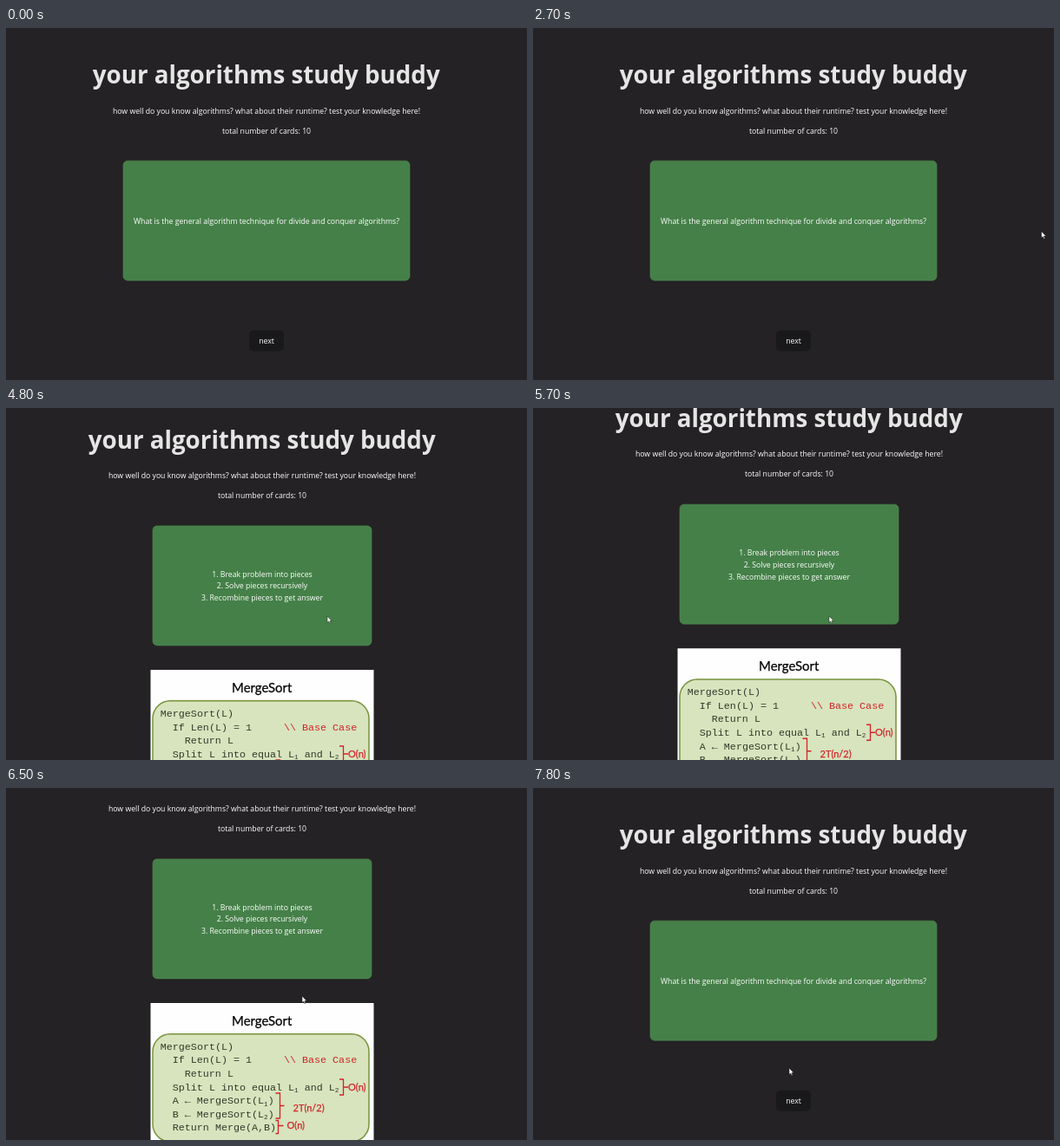
An HTML page for the animation above (8000 ms loop, 600 px wide and 406 px high).

```html
<!DOCTYPE html>
<html lang="en">
<head>
<meta charset="utf-8">
<title>Study cards</title>
<style>
  html, body { margin: 0; width: 100%; height: 100%; overflow: hidden; background: #242224; }
  svg { display: block; width: 100%; height: 100%; }
  text { font-family: "Open Sans", "Noto Sans", sans-serif; font-size: 8.7px; fill: #fff; white-space: pre; }
  .mid { text-anchor: middle; }
  .title { font-size: 27.75px; font-weight: 700; fill: #e5e5e5; }
  .card { fill: #458048; stroke: #4f8a53; stroke-width: .6; }
  .button { fill: #19181a; }
  .slide text { font-family: "Liberation Mono", "Courier New", monospace; font-size: 11.7px; fill: #34382c; }
  .slide .sub { font-size: 7.7px; }
  .slide .head, .slide .note { font-family: Lato, sans-serif; stroke-width: .25; }
  .slide .head { font-size: 14.9px; fill: #000; stroke: #000; }
  .slide .note { font-size: 11px; stroke: #d2232a; }
  .slide .red { fill: #d2232a; }
  .brace { fill: none; stroke: #d2232a; stroke-width: 1.3; }
</style>
</head>
<body>
<svg viewBox="0 0 600 406" preserveAspectRatio="none">
  <g id="page">
    <text class="title mid" x="299.7" y="64.1">your algorithms study buddy</text>
    <text class="mid" x="300" y="98.5">how well do you know algorithms? what about their runtime? test your knowledge here!</text>
    <text class="mid" x="300" y="121.5">total number of cards: 10</text>
    <g id="front">
      <rect class="card" x="135" y="153.2" width="330" height="138" rx="5"/>
      <text class="mid" x="300" y="225.8">What is the general algorithm technique for divide and conquer algorithms?</text>
    </g>
    <g id="back">
      <rect class="card" x="174" y="153.2" width="252" height="138" rx="5"/>
      <text class="mid" x="300" y="212">1. Break problem into pieces</text>
      <text class="mid" x="300" y="225.8">2. Solve pieces recursively</text>
      <text class="mid" x="300" y="239.6">3. Recombine pieces to get answer</text>
      <g class="slide" id="slide" transform="translate(171.5 319.3)">
        <rect width="257" height="188" fill="#fefefe"/>
        <text class="head mid" x="128.2" y="26">MergeSort</text>
        <rect x="2.5" y="35.8" width="249" height="124" rx="20" fill="#d7e4bd" stroke="#77933c" stroke-width="1.5"/>
        <path class="brace" d="M217.5 88h4.5v18h-4.5M222 97h5.5M144 104h5v29h-5M149 118.5h5M144 135.5h3v15h-3M147 141.5h6"/>
        <text class="note red" x="227.5" y="101">O(n)</text>
        <text class="note red" x="164" y="125.5">2T(n/2)</text>
        <text class="note red" x="157" y="145.5">O(n)</text>
        <text class="red" x="153.5" y="69.5">\\ Base Case</text>
      </g>
    </g>
    <g id="next">
      <rect class="button" x="280" y="348.7" width="40" height="24" rx="5"/>
      <text class="mid" x="300" y="364.3">next</text>
    </g>
  </g>
  <path id="cursor" d="M0 0V7.5L1.7 6 2.9 8.7 4 8.2 2.9 5.6H5.2Z" fill="#fff" stroke="#111" stroke-width=".5"/>
</svg>
<script>
const LOOP = 8000, STEP = 100;
const FLIP = 4400, FLIP_BACK = 7300, CURSOR_IN = 2700;
const $ = id => document.getElementById(id);

// [time, x, y]
const cursorKeys = [
  [2700, 585.5, 234.5], [2800, 562, 241], [2900, 515, 228], [3000, 465, 208], [3100, 430, 198],
  [3200, 430, 198], [3700, 392, 228], [4200, 370, 240], [4900, 370, 240], [5500, 341, 240],
  [6700, 341, 240], [7100, 318, 108.5], [7300, 316, 120], [7700, 295, 305], [7800, 295, 323]
];
// [time, offset]
const scrollKeys = [[5100, 0], [5900, 33], [6100, 33], [6500, 54], [6800, 130], [6900, 137]];

// Code lines: indent and text, "_" marks a subscript digit.
const code = [
  [0, "MergeSort(L)"],
  [14, "If Len(L) = 1"],
  [28, "Return L"],
  [14, "Split L into equal L_1 and L_2"],
  [14, "A ← MergeSort(L_1)"],
  [14, "B ← MergeSort(L_2)"],
  [14, "Return Merge(A,B)"]
];

function add(parent, name, attrs, content) {
  const el = document.createElementNS("http://www.w3.org/2000/svg", name);
  for (const key in attrs) el.setAttribute(key, attrs[key]);
  if (content) el.textContent = content;
  return parent.appendChild(el);
}

code.forEach(([indent, line], i) => {
  const row = add($("slide"), "text", { x: 11.3 + indent, y: 53.9 + 15.6 * i });
  line.split(/(_\d)/).filter(Boolean).forEach((part, n) => {
    const sub = part[0] === "_";
    const dy = sub ? 2.5 : n ? -2.5 : 0;
    add(row, "tspan", sub ? { class: "sub", dy } : { dy }, sub ? part[1] : part);
  });
});

function sample(keys, t) {
  if (t <= keys[0][0]) return keys[0].slice(1);
  for (let i = 1; i < keys.length; i++) {
    const a = keys[i - 1], b = keys[i];
    if (t <= b[0]) {
      const p = (t - a[0]) / (b[0] - a[0]);
      return a.slice(1).map((v, k) => v + (b[k + 1] - v) * p);
    }
  }
  return keys[keys.length - 1].slice(1);
}

const show = (id, on) => $(id).setAttribute("visibility", on ? "visible" : "hidden");
const move = (id, x, y) => $(id).setAttribute("transform", `translate(${x} ${y})`);

function draw(t) {
  const flipped = t >= FLIP && t < FLIP_BACK;
  show("front", !flipped);
  show("back", flipped);
  show("cursor", t >= CURSOR_IN);
  // The answer makes the page taller: it shifts up and makes room for a scrollbar.
  if (flipped) move("page", -5, -17.3 - sample(scrollKeys, t)[0]);
  else move("page", 0, 0);
  move("next", 0, flipped ? 187 : 0);
  move("cursor", ...sample(cursorKeys, t));
}

const start = performance.now();
function tick() {
  const t = (performance.now() - start) % LOOP;
  draw(Math.floor(t / STEP) * STEP);
  requestAnimationFrame(tick);
}
tick();
</script>
</body>
</html>
```
